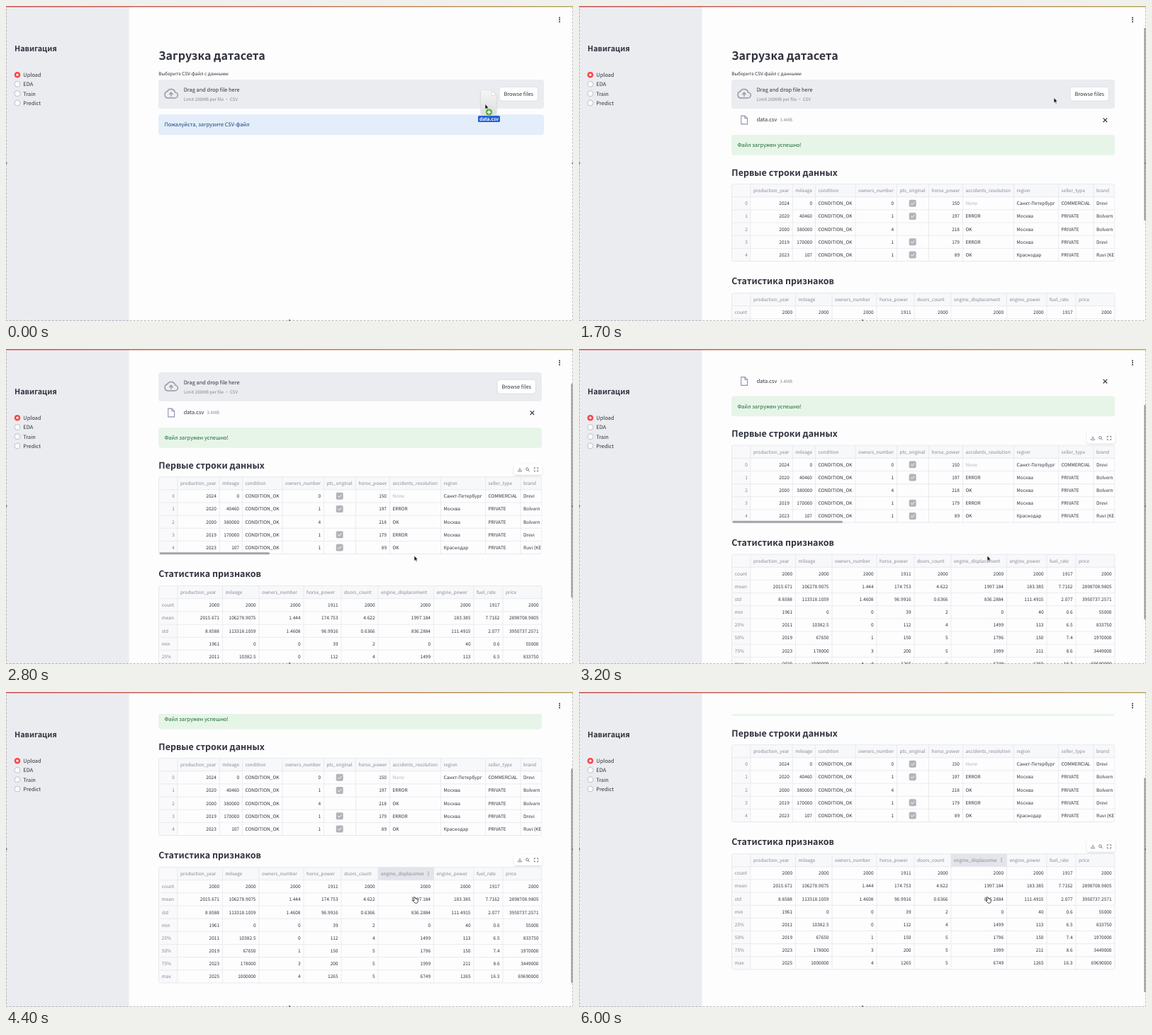
Animation of 800 by 445 pixels, one loop 6100 ms. Source, as an HTML page:

```html
<!DOCTYPE html>
<html lang="ru">
<head>
<meta charset="utf-8">
<title>Загрузка датасета</title>
<style>
html, body { margin: 0; width: 100%; height: 100%; overflow: hidden; background: #fdfdfe; }
svg { display: block; width: 800px; height: 445px; }
text { text-rendering: geometricPrecision; white-space: pre; }
</style>
</head>
<body>
<svg id="stage" viewBox="0 0 800 445" xmlns="http://www.w3.org/2000/svg"></svg>
<script>
const LOOP = 6100, STEP = 100;
const INK = '#31333f', GREY = '#85868e', LINE = '#e3e4e9', PANEL = '#ebecf0';

// Fonts: pick a proportional Cyrillic face, then size each style from one sample line.
const CJK = '"Noto Sans CJK SC", "Noto Sans CJK JP", "Noto Sans CJK", "Noto Sans", sans-serif';
const pen = document.createElement('canvas').getContext('2d');
const widthOf = (s, weight, family) => {
  pen.font = `${weight} 100px ${family}`;
  return pen.measureText(s).width;
};
const fixedPitch = widthOf('г', 400, CJK) === widthOf('Ш', 400, CJK);
const CYR = fixedPitch ? '"Noto Sans", sans-serif' : CJK;
const style = (sample, width, weight = 400, family = CJK) =>
  ({ weight, family, size: 100 * width / widthOf(sample, weight, family) });

const S = {
  h1: style('Загрузка датасета', 150.5, 700, CYR),
  h2: style('Первые строки данных', 149.5, 700, CYR),
  side: style('Навигация', 60, 700, CYR),
  label: style('Выберите CSV-файл с данными', 99, 400, CYR),
  alert: style('Пожалуйста, загрузите CSV-файл', 120.5, 400, CYR),
  body: style('Drag and drop file here', 79),
  small: style('Limit 200MB per file • CSV', 76.5),
  head: style('accidents_resolution', 63.5),
  cell: style('CONDITION_OK', 48),
  city: style('Санкт-Петербург', 54.3, 400, CYR),
  tag: style('data.csv', 27, 700)
};

const text = (s, x, y, st, fill = INK, anchor = 'start') =>
  `<text x="${x}" y="${y}" font-family='${st.family}' font-weight="${st.weight}" ` +
  `font-size="${st.size.toFixed(3)}" fill="${fill}" text-anchor="${anchor}">${s}</text>`;
const rect = (x, y, w, h, fill, extra = '') =>
  `<rect x="${x}" y="${y}" width="${w}" height="${h}" fill="${fill}" ${extra}/>`;
const path = (d, stroke, w = 1, extra = '') =>
  `<path d="${d}" fill="none" stroke="${stroke}" stroke-width="${w}" ${extra}/>`;
const group = (id, body, extra = '') => `<g id="${id}" ${extra}>${body}</g>`;

const ROW = 18.15, RIGHT = 756;

function grid(top, rows, xs) {
  const h = ROW * (rows + 1);
  let d = '';
  for (let i = 1; i <= rows; i++) d += `M215.5 ${top + i * ROW}H${RIGHT}`;
  for (const x of xs) d += `M${x} ${top}V${top + h}`;
  return rect(215.5, top, RIGHT - 215.5, ROW, '#f7f8fa') + rect(215.5, top, 26.5, h, '#f9f9fb') +
    path(d, LINE, 0.7) + rect(215.5, top, RIGHT - 215.5, h, 'none', `stroke="${LINE}" stroke-width=".8" rx="3"`);
}
const midRow = (top, i) => top + ROW * (i + 0.5) + 2.4;

function toolbar(id, top) {
  const y = top - 10.3;
  return group(id,
    rect(716.5, y - 7.5, 40, 15, '#fff', 'rx="3" filter="url(#soft)"') +
    path(`M725 ${y - 2.6}v3.6m-1.5-1.4l1.5 1.5l1.5-1.5M722.5 ${y + 1}v1.6h5v-1.6`, '#6d6f79', 0.8) +
    `<circle cx="735.4" cy="${y - 0.6}" r="1.8" fill="none" stroke="#6d6f79" stroke-width=".9"/>` +
    path(`M736.8 ${y + 0.8}l2 2`, '#6d6f79', 1) +
    path(`M745.3 ${y - 0.8}v-1.7h1.8m1.8 0h1.8v1.7m0 1.6v1.7h-1.8m-1.8 0h-1.8v-1.7`, '#6d6f79', 0.9));
}

function firstTable() {
  const top = 251.6, xs = [242, 301.3, 333.5, 390, 448.5, 493.5, 541.5, 613.5, 676.5, 726];
  const names = ['production_year', 'mileage', 'condition', 'owners_number', 'pts_original',
    'horse_power', 'accidents_resolution', 'region', 'seller_type', 'brand'];
  const rows = [
    '2024|0|0|150|None|Санкт-Петербург|COMMERCIAL|Drevi',
    '2020|40460|1|197|ERROR|Москва|PRIVATE|Bolvern',
    '2000|380000|4|218|OK|Москва|PRIVATE|Bolvern',
    '2019|170000|1|179|ERROR|Москва|PRIVATE|Drevi',
    '2023|107|1|89|OK|Краснодар|PRIVATE|Ruvi (KE'];
  let out = grid(top, 5, xs);
  names.forEach((n, i) => out += text(n, xs[i] + 4, midRow(top, 0), S.head, GREY));
  rows.forEach((line, r) => {
    const [year, miles, owners, power, accident, city, seller, brand] = line.split('|');
    const y = midRow(top, r + 1);
    const num = (s, col) => text(s, xs[col + 1] - 4.5, y, S.cell, INK, 'end');
    const str = (s, col, st = S.cell, fill = INK) => text(s, xs[col] + 4, y, st, fill);
    out += text(r, 237.8, y, S.cell, GREY, 'end') + num(year, 0) + num(miles, 1) +
      str('CONDITION_OK', 2) + num(owners, 3) + num(power, 5) +
      str(accident, 6, S.cell, accident === 'None' ? '#b0b1b8' : INK) +
      str(city, 7, S.city) + str(seller, 8) + str(brand, 9);
    if (r !== 2) out += rect(465.7, y - 7.4, 10, 10, '#b3b4b9', 'rx="2"') +
      path(`M468.2 ${y - 2.4}l1.8 1.8l3.3-3.5`, '#fff', 1);
  });
  return out;
}

function secondTable() {
  const top = 405.6, xs = [242, 305.5, 357, 420, 473, 525, 603.5, 660, 701];
  const names = ['production_year', 'mileage', 'owners_number', 'horse_power', 'doors_count',
    'engine_displacement', 'engine_power', 'fuel_rate', 'price'];
  const rows = [
    'count 2000 2000 2000 1911 2000 2000 2000 1917 2000',
    'mean 2015.671 106278.9075 1.444 174.753 4.622 1997.184 183.385 7.7162 2898708.9805',
    'std 8.8588 113318.1059 1.4608 96.9916 0.6366 836.2884 111.4915 2.077 3950737.2571',
    'min 1961 0 0 39 2 0 40 0.6 55000',
    '25% 2011 10382.5 0 112 4 1499 113 6.5 833750',
    '50% 2019 67650 1 150 5 1796 150 7.4 1970000',
    '75% 2023 178000 3 200 5 1999 211 8.6 3449000',
    'max 2025 1000000 4 1265 5 6749 1265 16.3 69690000'];
  const y = midRow(top, 0);
  let out = grid(top, 8, xs);
  names.forEach((n, i) => out += text(n, xs[i] + 4, y, S.head, GREY));
  rows.forEach((line, r) => line.split(' ').forEach((s, i) => {
    const base = midRow(top, r + 1);
    out += i ? text(s, (xs[i] || RIGHT) - 4.5, base, S.cell, INK, 'end')
      : text(s, 219.8, base, S.cell, GREY);
  }));
  const dots = [-2.2, 0, 2.2].map(d => `<circle cx="596" cy="${y - 2.4 + d}" r=".65" fill="${GREY}"/>`).join('');
  return out + group('hover', rect(525, top, 78.5, ROW, '#e3e5eb') +
    `<g clip-path="url(#cut)">${text(names[5], 529, y, S.head, GREY)}</g>` + dots);
}

const zone = rect(215, 104, 544, 41, PANEL, 'id="zone" rx="4"') +
  path('M228.5 130h9.6a4 4 0 0 0 .6-8a6 6 0 0 0-11.2-1.2a4.7 4.7 0 0 0 1 9.2z', '#9598a5', 1.5) +
  path('M233 128v-5.5m-2.6 2.4l2.6-2.6l2.6 2.6', '#9598a5', 1.4) +
  text('Drag and drop file here', 250.7, 121, S.body) +
  text('Limit 200MB per file • CSV', 250.7, 134.4, S.small, GREY) +
  group('browse', rect(696, 114.3, 54.5, 19.8, '#fff', 'rx="4" stroke="#d9dae0" stroke-width=".8"') +
    text('Browse files', 723.2, 127, S.body, INK, 'middle'));

const fileRow = path('M228.8 155.7h5.2l3.6 3.6v8.2h-8.8zM234 155.7v3.6h3.6', '#8f93ae', 1.1, 'stroke-linejoin="round" transform="translate(0 -.6)"') +
  text('data.csv', 250.7, 163.4, S.body) + text('3.4MB', 283.5, 163.2, S.small, GREY) +
  path('M739.6 158.4l5.6 5.6m0-5.6l-5.6 5.6', INK, 1.1);

const content =
  text('Загрузка датасета', 215.3, 76.3, S.h1) +
  text('Выберите CSV-файл с данными', 215.2, 98.2, S.label) + zone +
  group('file', fileRow) +
  group('info', rect(215, 153.3, 544, 29, '#e4edfa', 'rx="4"') +
    text('Пожалуйста, загрузите CSV-файл', 223.4, 170.4, S.alert, '#174378')) +
  group('done', rect(215, 182, 544, 28.8, '#e7f5e9', 'id="okBox" rx="4"') +
    text('Файл загружен успешно!', 223.4, 199.4, S.alert, '#186b31') +
    text('Первые строки данных', 215.3, 239.6, S.h2)) +
  group('table1', firstTable(), 'clip-path="url(#page)"') +
  group('slide', rect(216.5, 358.3, 155.5, 3, '#a2a3aa', 'rx="1.5"')) + toolbar('tools1', 251.6) +
  group('table2', text('Статистика признаков', 215.3, 393.4, S.h2) + secondTable()) + toolbar('tools2', 405.6);

const nav = ['Upload', 'EDA', 'Train', 'Predict'].map((s, i) => {
  const y = 97.2 + i * 13.25;
  const dot = i ? `<circle cx="16" cy="${y}" r="4" fill="#fbfbfd" stroke="#bbbcc4" stroke-width=".9"/>`
    : `<circle cx="16" cy="${y}" r="4.3" fill="#f44a4a"/><circle cx="16" cy="${y}" r="1.6" fill="#fff"/>`;
  return dot + text(s, 24.3, y + 2.9, S.body);
}).join('');

const drag = `<path d="M-6-19H9l7 7V14H-6z" fill="url(#paper)" filter="url(#soft)"/>` +
  `<path d="M9-19v7h7z" fill="#fff" stroke="#c9c9c9" stroke-width=".6"/>` +
  rect(-10, 16.4, 31, 9, '#2560d6', 'rx="1.5"') + text('data.csv', 5.5, 23.3, S.tag, '#fff', 'middle');
const plus = `<circle cx="5.5" cy="11.5" r="5" fill="#58ad3c" stroke="#e6f2e0" stroke-width=".6"/>` +
  path('M5.5 8.7v5.6m-2.8-2.8h5.6', '#fff', 1.4);
const arrow = `<path d="M0 0V7.4L1.7 5.9L2.9 8.6L4.1 8.1L2.9 5.4H5.2z" fill="#111" stroke="#fff" stroke-width=".6"/>`;
const hand = `<path d="M.2-1.2q.8-.8 1.5.2l1 2l2.6.6q1.2.5 1 1.7l-.5 3.2q-.2.7-1 .7H2.2L-.7 4.2q-.3-.9.7-.9l1 .5L0-.1z" ` +
  `transform="translate(-1 -1)" fill="#fff" stroke="#222" stroke-width=".8" stroke-linejoin="round"/>`;

const stage = document.getElementById('stage');
stage.innerHTML = `<defs>
  <linearGradient id="stripe"><stop offset="0" stop-color="#dc4b4b"/><stop offset=".5" stop-color="#dd7358"/><stop offset="1" stop-color="#c9b95a"/></linearGradient>
  <linearGradient id="paper" x2="0" y2="1"><stop offset="0" stop-color="#f6f6f6"/><stop offset="1" stop-color="#dededf"/></linearGradient>
  <filter id="soft" x="-30%" y="-40%" width="160%" height="190%"><feDropShadow dx="0" dy=".8" stdDeviation="1.3" flood-opacity=".2"/></filter>
  <clipPath id="view"><rect x="174" y="31" width="626" height="414"/></clipPath>
  <clipPath id="page"><rect x="215" y="251" width="541.3" height="112"/></clipPath>
  <clipPath id="cut"><rect x="525" y="405" width="64.5" height="20"/></clipPath>
</defs>` + rect(0, 0, 800, 445, '#fdfdfe') +
  `<g clip-path="url(#view)">${group('content', content)}${rect(797.3, 0, 2.2, 303, '#9d9da1', 'id="thumb" rx="1.1"')}</g>` +
  rect(0, 0, 173.6, 445, PANEL) + text('Навигация', 12, 64.3, S.side) + nav +
  [16.4, 19.3, 22.2].map(y => `<circle cx="781" cy="${y}" r="1" fill="${INK}"/>`).join('') +
  rect(0, 0, 800, 1.6, 'url(#stripe)') +
  rect(0.5, 0.5, 799, 444, 'none', 'stroke="#8c8c90" stroke-width=".8" stroke-dasharray="3 2" opacity=".75"') +
  [[0.5, 222], [799.5, 222], [400, 444]].map(([x, y]) => `<circle cx="${x}" cy="${y}" r="1.2" fill="#77777c"/>`).join('') +
  group('pointer', group('drag', drag) + group('arrow', arrow) + group('plus', plus) + group('hand', hand));

const el = {};
stage.querySelectorAll('[id]').forEach(n => el[n.id] = n);
const show = (id, on) => el[id].setAttribute('display', on ? 'inline' : 'none');
const move = (id, x, y) => el[id].setAttribute('transform', `translate(${x} ${y})`);

// Piecewise linear track of [time, value] pairs.
function track(keys, t) {
  if (t <= keys[0][0]) return keys[0][1];
  for (let i = 1; i < keys.length; i++) {
    const [t0, a] = keys[i - 1], [t1, b] = keys[i];
    if (t <= t1) return a + (b - a) * (t - t0) / (t1 - t0);
  }
  return keys[keys.length - 1][1];
}
const SCROLL = [[2200, 0], [2500, 28], [2800, 71], [3000, 97], [3200, 115.5], [3500, 131], [4000, 140.5],
  [4200, 142], [4400, 158], [4600, 166], [4900, 171], [5300, 175], [5600, 177]];
const ease = p => p * p * (3 - 2 * p);

function draw(t) {
  const dragging = t < 300, full = t >= 900, y = track(SCROLL, t);
  const onFirst = t >= 2000 && t < 3300, onSecond = t >= 3300;
  const drop = ease(Math.min(t / 300, 1));
  const go = ease(Math.min(Math.max((t - 1700) / 500, 0), 1));

  move('content', 0, -y);
  el.thumb.setAttribute('y', y * 0.685);
  const w = full ? 541 : 544;
  el.zone.setAttribute('width', w);
  el.okBox.setAttribute('width', w);
  move('browse', w - 544, 0);
  move('info', 0, dragging ? 0 : 28.7);
  move('pointer', 676 - 6 * drop - 94 * go, 138.5 - 9 * drop + 162.5 * go);

  show('drag', dragging);
  show('plus', dragging);
  show('file', !dragging);
  show('info', t < 700);
  show('done', t >= 700);
  show('table1', full);
  show('thumb', full);
  show('table2', t >= 1100);
  show('slide', onFirst);
  show('tools1', onFirst);
  show('tools2', onSecond);
  show('hover', onSecond);
  show('arrow', !onSecond);
  show('hand', onSecond);
}

const start = performance.now();
function tick() {
  const t = (performance.now() - start) % LOOP;
  draw(Math.floor(t / STEP) * STEP);
  requestAnimationFrame(tick);
}
draw(0);
requestAnimationFrame(tick);
</script>
</body>
</html>
```
